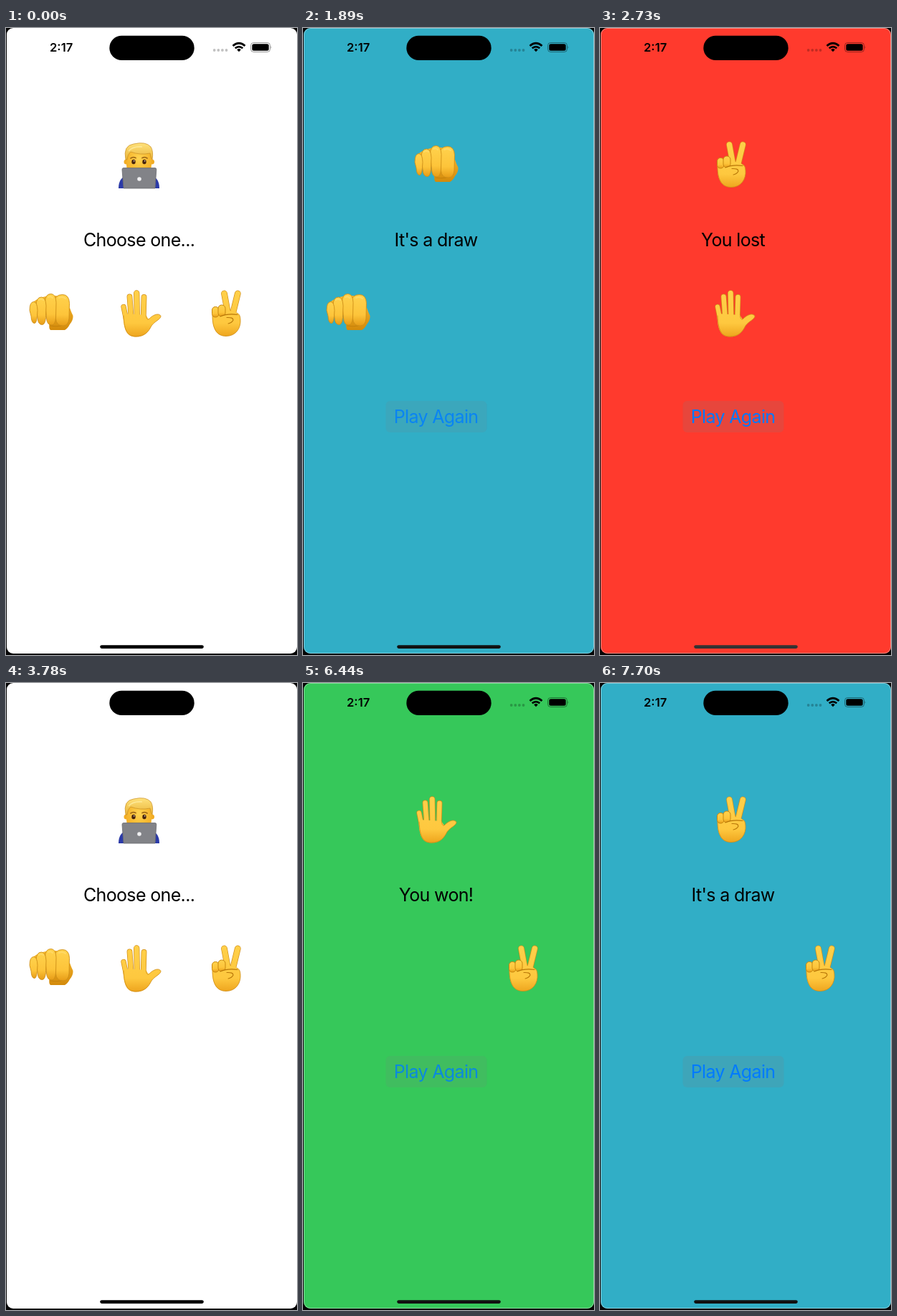
An HTML page that plays this animation: 406x876 px, repeating every 8610 ms.

```html
<!DOCTYPE html>
<html lang="en">
<head>
<meta charset="utf-8">
<title>Fist, palm, fingers</title>
<style>
  html, body { margin: 0; width: 100%; height: 100%; overflow: hidden; background: #000; }
  svg { display: block; width: 100vw; height: 100vh; }
  text { font-family: Inter, "Liberation Sans", sans-serif; }
  .label { font-size: 25px; letter-spacing: -0.65px; text-anchor: middle; }
  .time { font-size: 16.6px; font-weight: 600; }
  .edge { fill: none; stroke: #cf8c16; stroke-linecap: round; stroke-linejoin: round; }
  .crease { fill: none; stroke: #b87708; stroke-width: 1.1; stroke-linecap: round; }
  .shine { fill: none; stroke: #ffe07a; stroke-width: 2; stroke-linecap: round; opacity: .55; }
</style>
</head>
<body>
<svg viewBox="0 0 406 876" preserveAspectRatio="none">
  <defs>
    <linearGradient id="skin" gradientUnits="userSpaceOnUse" x1="0" y1="366" x2="0" y2="432">
      <stop offset="0" stop-color="#ffd04a"/><stop offset=".7" stop-color="#fec83f"/><stop offset="1" stop-color="#eda31c"/>
    </linearGradient>
    <linearGradient id="wrist" x1="0" y1="0" x2="0" y2="1">
      <stop offset="0" stop-color="#eeac24"/><stop offset="1" stop-color="#d38a0b"/>
    </linearGradient>
    <linearGradient id="finger" x1="0" y1="0" x2="0" y2="1">
      <stop offset="0" stop-color="#ffd24d"/><stop offset=".65" stop-color="#fdc43a"/><stop offset="1" stop-color="#e79c17"/>
    </linearGradient>
    <linearGradient id="hair" x1="0" y1="0" x2="0" y2="1">
      <stop offset="0" stop-color="#ffe27c"/><stop offset="1" stop-color="#e9b53a"/>
    </linearGradient>
    <radialGradient id="face" cx=".5" cy=".4" r=".65">
      <stop offset="0" stop-color="#ffd451"/><stop offset="1" stop-color="#f2a91e"/>
    </radialGradient>

    <g id="fist">
      <path d="M60.500 413Q59.500 420 62 422H82Q86 420 89 414Q94 408 93.500 402Q91 397 89 391L70 404Z" fill="url(#wrist)"/>
      <path class="crease" opacity=".6" d="M62 416Q80 419 87 409"/>
      <path d="M36 384Q52 372 70 374L86 380L84 402L38 400Z" fill="#f6b52b"/>
      <g id="knuckles"></g>
      <path class="shine" d="M74 377Q79 374.500 83 378M59 376Q62 374 65 377M46 380Q49 377.500 52 380"/>
    </g>

    <g id="palm">
      <g id="palmFingers"></g>
      <path d="M163.500 399C163.500 416 166 431.500 181 431.500C194 431.500 199 424 203 416C207 410 216 407 216 402.500C214 398 206 399.500 199 407L195 401Z" fill="url(#skin)"/>
      <path class="edge" stroke-width=".8" d="M164 402C165 424 170 431 181 431C194 431 199 424 203 416C207 410 216 407 216 402.500C214 398 206 399.500 199 407Q196 408 195.500 402"/>
    </g>

    <g id="peace">
      <g id="peaceFingers"></g>
      <path d="M288 399C287 419 293 430.500 307 430.500C321 430.500 328 419 327 407Q327 399 320 397L305 393Z" fill="url(#skin)"/>
      <path class="edge" stroke-width=".8" d="M288 402C288 420 294 430.500 307 430.500C321 430.500 328 419 327 407Q327 400 322 398"/>
      <rect x="287.500" y="389.500" width="9.500" height="14.500" rx="4.500" fill="url(#finger)" stroke="#c6860f"/>
      <rect x="296" y="387" width="10" height="16" rx="4.800" fill="url(#finger)" stroke="#c6860f"/>
      <path d="M299 403Q310 398.500 322 401Q326 405 320 408Q312 404 300 405Z" fill="url(#skin)"/>
      <path class="crease" d="M299 403Q309 398.500 323 400.500M308 404.500Q317 404 317 408Q315 412 310 413"/>
    </g>

    <g id="coder">
      <path d="M157 224Q157 209 169 206H202Q214 209 214 224Z" fill="#2b3aa8"/>
      <circle cx="168" cy="187" r="3.500" fill="#f2ac24"/><circle cx="203.500" cy="187" r="3.500" fill="#f2ac24"/>
      <path d="M168 180Q168 165 185.500 165Q203 165 203 180V190Q203 208 185.500 208Q168 208 168 190Z" fill="url(#face)"/>
      <path d="M167 184Q163 164 178 162Q195 158 202 166Q206 172 204 184Q202 182 201 175Q187 178 174 173Q170 176 169 184Z" fill="url(#hair)" stroke="#c98f25" stroke-width=".7"/>
      <path d="M171 172Q177 165 190 166" fill="none" stroke="#fff0a8" stroke-width="1.500" opacity=".7"/>
      <path d="M174 182Q177 179.500 181 181.500M190 181.500Q194 179.500 197 182" fill="none" stroke="#a06a18" stroke-width="1.700" stroke-linecap="round"/>
      <ellipse cx="178" cy="187" rx="2.700" ry="3.200" fill="#47240d"/><ellipse cx="193" cy="187" rx="2.700" ry="3.200" fill="#47240d"/>
      <circle cx="178.600" cy="185.700" r=".8" fill="#fff"/><circle cx="193.600" cy="185.700" r=".8" fill="#fff"/>
      <path d="M163.500 195.500H208Q210 195.500 209.800 198L208 224H164L162 198Q162 195.500 163.500 195.500Z" fill="#828388" stroke="#6b6c71" stroke-width=".8"/>
      <circle cx="186" cy="211" r="2.800" fill="#f0f0f2"/>
    </g>
  </defs>

  <rect width="406" height="876" fill="#050505"/>
  <rect id="screen" x="1" y="0" width="405" height="874" rx="9"/>
  <rect id="rim" x="1.500" y=".5" width="404" height="873" rx="9" fill="none" stroke="#fff" stroke-opacity=".4"/>
  <rect x="144.300" y="10.800" width="118.400" height="34.200" rx="17.100"/>

  <g id="status">
    <text class="time" x="61" y="33">2:17</text>
    <g id="dots" opacity=".24"></g>
    <g fill="none" stroke="currentColor" stroke-width="2.700">
      <path d="M316.500 25Q325 17.500 333.500 25"/>
      <path d="M319.700 28.300Q325 23.800 330.300 28.300"/>
    </g>
    <path d="M322.200 30.200Q325 28 327.800 30.200L325 33.200Z"/>
    <rect x="341.500" y="20.500" width="27" height="13" rx="4" fill="none" stroke="currentColor" stroke-opacity=".4"/>
    <rect x="343.300" y="22.300" width="23.400" height="9.400" rx="2.500"/>
    <path d="M369.600 25Q371.300 27 369.600 29Z" opacity=".5"/>
  </g>

  <use id="opponent"/>
  <text id="message" class="label" x="185.600" y="305"></text>
  <g id="choices"></g>
  <g id="again">
    <rect x="115.500" y="521" width="141" height="44" rx="6" fill="#787880" fill-opacity=".18"/>
    <text class="label" x="185.600" y="552" fill="#007aff">Play Again</text>
  </g>
  <rect id="home" x="131.200" y="862.200" width="144.600" height="4.700" rx="2.350"/>
</svg>
<script>
const LOOP = 8610, STEP = 70, FADE = 280;
const TEAL = '#31aec6', RED = '#ff3a2d', GREEN = '#36c85a';
const OFFSETS = { fist: [123, -207], palm: [-2, -208], peace: [-124, -208], coder: [0, 0] };
const ROUNDS = [
  { tap: 840, show: 1120, press: 1890, reset: 2030, pick: 'fist', foe: 'fist', message: "It's a draw", color: TEAL },
  { tap: 2590, show: 2730, press: 3710, reset: 3780, pick: 'palm', foe: 'peace', message: 'You lost', color: RED },
  { tap: 4480, show: 4550, press: 6440, reset: 6580, pick: 'peace', foe: 'palm', message: 'You won!', color: GREEN },
  { tap: 7420, show: 7560, press: LOOP, reset: LOOP, pick: 'peace', foe: 'peace', message: "It's a draw", color: TEAL }
];

const $ = id => document.getElementById(id);
const clamp = v => Math.max(0, Math.min(1, v));

function add(parent, tag, attrs) {
  const el = document.createElementNS('http://www.w3.org/2000/svg', tag);
  for (const [name, value] of Object.entries(attrs)) el.setAttribute(name, value);
  parent.append(el);
  return el;
}

// A raised finger: a rounded stroke over a slightly wider dark one.
function raiseFinger(parent, d, width) {
  add(parent, 'path', { d, class: 'edge', 'stroke-width': width + .8 });
  add(parent, 'path', { d, fill: 'none', stroke: 'url(#skin)', 'stroke-width': width - .6, 'stroke-linecap': 'round' });
}

// A folded finger that leans right and narrows toward its rounded lower end.
function foldFinger(x, top, width, bottom) {
  const right = x + width, mid = x + width * .55;
  const d = `M${x} ${top + 12}Q${x} ${top} ${mid} ${top}Q${right} ${top} ${right + .5} ${top + 12}` +
    `L${right} ${bottom - 10}Q${right - 1} ${bottom} ${mid + 1} ${bottom}Q${x + 2.5} ${bottom} ${x + 2} ${bottom - 10}Z`;
  add($('knuckles'), 'path', { d, fill: 'url(#finger)', stroke: '#cf8f18', 'stroke-width': .9 });
}

foldFinger(67.500, 372.500, 20.500, 416);
foldFinger(54.500, 371.500, 15, 415);
foldFinger(42, 376, 13.500, 414.500);
foldFinger(33, 382.500, 10.500, 412.500);

raiseFinger($('palmFingers'), 'M164 389.500L168 409', 6.500);
raiseFinger($('palmFingers'), 'M172.500 375.500L175 410', 7);
raiseFinger($('palmFingers'), 'M182.200 370.500L183 410', 7.500);
raiseFinger($('palmFingers'), 'M192.500 376L191.500 410', 7);
raiseFinger($('peaceFingers'), 'M304.500 371L310 401', 8);
raiseFinger($('peaceFingers'), 'M323.300 371L316 401', 8);

for (let i = 0; i < 4; i++) add($('dots'), 'circle', { cx: 290.700 + i * 5.600, cy: 31, r: 1.900 });

const choices = {};
for (const hand of ['fist', 'palm', 'peace']) choices[hand] = add($('choices'), 'use', { href: '#' + hand });

// The status bar turns light on red and dark again after the reset.
function statusLight(t) {
  const { show, reset } = ROUNDS[1];
  return t < reset ? clamp((t - show) / FADE) : 1 - clamp((t - reset) / FADE);
}

function render(time) {
  const t = Math.floor((time % LOOP) / STEP) * STEP;
  const round = ROUNDS.find(r => t < r.reset);
  const playing = t >= round.show;
  const foe = playing ? round.foe : 'coder';

  $('screen').setAttribute('fill', playing ? round.color : '#fff');
  $('rim').setAttribute('visibility', playing ? 'visible' : 'hidden');
  $('opponent').setAttribute('href', '#' + foe);
  $('opponent').setAttribute('transform', `translate(${OFFSETS[foe]})`);
  $('message').textContent = playing ? round.message : 'Choose one...';

  for (const [hand, el] of Object.entries(choices)) {
    const picked = hand === round.pick;
    el.setAttribute('visibility', playing && !picked ? 'hidden' : 'visible');
    el.setAttribute('opacity', picked && !playing && t >= round.tap ? .6 : 1);
  }

  $('again').setAttribute('visibility', playing ? 'visible' : 'hidden');
  $('again').setAttribute('opacity', t >= round.press ? .8 : 1);

  const level = Math.round(255 * statusLight(t));
  const ink = `rgb(${level},${level},${level})`;
  $('status').setAttribute('fill', ink);
  $('status').setAttribute('color', ink);
  $('home').setAttribute('fill', !playing ? '#000' : round.color === RED ? '#333' : '#111');
}

const start = performance.now();
function tick() {
  render(performance.now() - start);
  requestAnimationFrame(tick);
}
tick();
</script>
</body>
</html>
```
